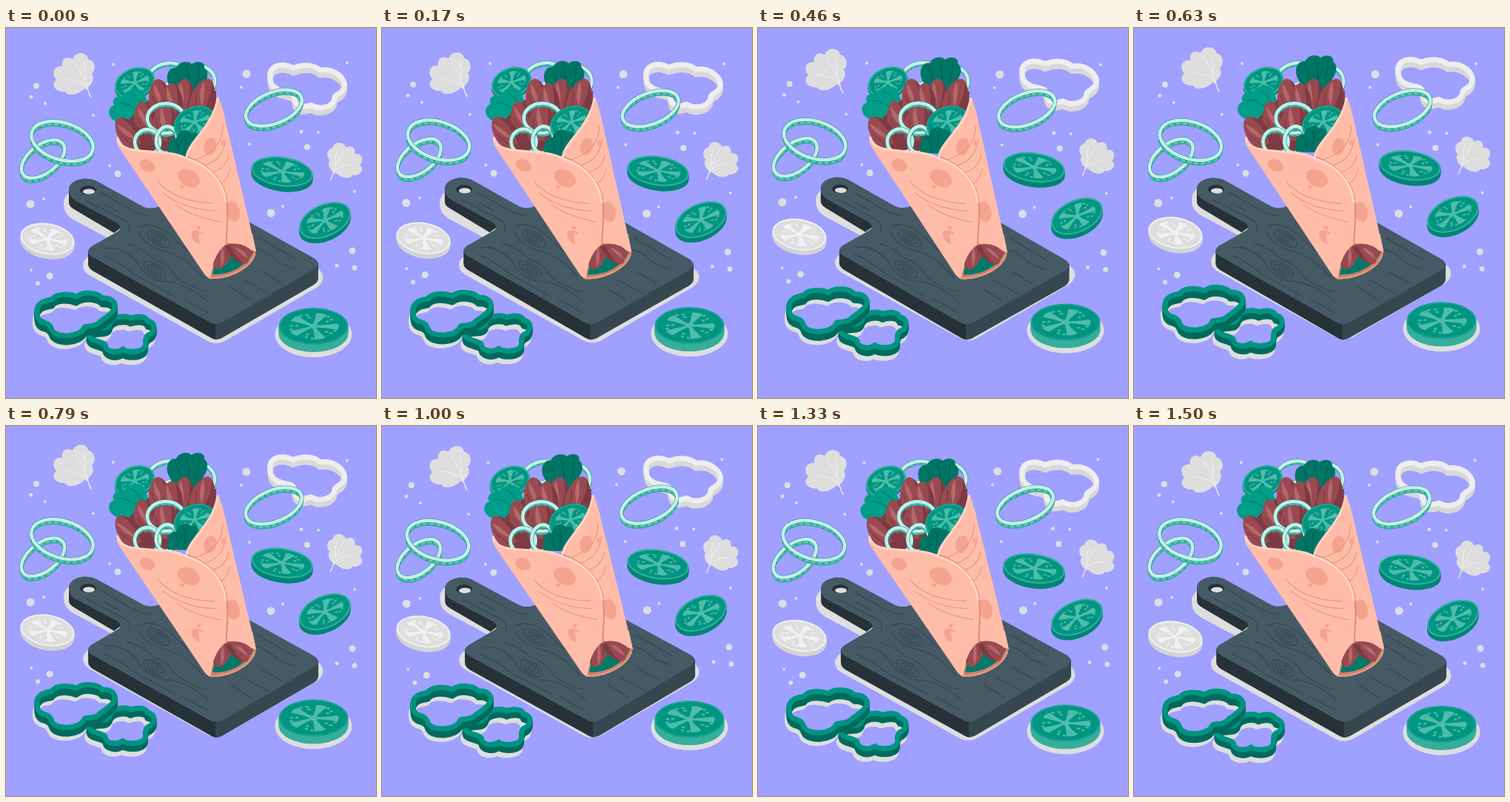
These frames come from a looping animation (500 by 500 pixels, 1540 ms). An HTML page:

```html
<!DOCTYPE html>
<html lang="en">
<head>
<meta charset="utf-8">
<title>Wrap on a board</title>
<style>
html, body { margin: 0; width: 100%; height: 100%; overflow: hidden; background: #9fa0ff; }
svg { display: block; width: 100%; height: 100%; }
</style>
</head>
<body>
<svg id="stage" viewBox="0 0 500 500"></svg>
<script>
const GREY = '#dedede';
const teal = { face: '#009582', flesh: '#4dbdab', side: '#36ae9b', rim: '#17a390' };
const tealDark = { ...teal, side: '#008474', rim: '#33b19e' };
const pale = { face: '#dedede', flesh: '#f1f1f1', side: '#d3d3d3', rim: '#f1f1f1' };

const path = (d, fill, more = '') => `<path d="${d}" fill="${fill}" ${more}/>`;
const line = (d, color, width = 1.2) =>
  path(d, 'none', `stroke="${color}" stroke-width="${width}" stroke-linecap="round" stroke-linejoin="round"`);
const oval = (x, y, rx, ry, fill, turn = 0, more = '') =>
  `<ellipse cx="${x}" cy="${y}" rx="${rx}" ry="${ry}" fill="${fill}" transform="rotate(${turn} ${x} ${y})" ${more}/>`;
const at = (x, y, art, more = '') => `<g transform="translate(${x} ${y}) ${more}">${art}</g>`;
const sway = art => `<g class="sway">${art}</g>`;
const float = (lift, art) => `<g data-lift="${lift}">${art}</g>`;

// Tomato slice: extruded disc with flared spokes and seeds between them
function tomato(x, y, rx, ry, turn, depth, c) {
  let inside = '';
  for (let i = 0; i < 5; i++) {
    inside += `<g transform="rotate(${i * 72 + 20})">` +
      path('M-4 0C-6 -26 -10 -48 -17 -68Q0 -78 17 -68C10 -48 6 -26 4 0Z', c.flesh) +
      [[22, -63], [36, -51], [29, -38]].map(([sx, sy]) => oval(sx, sy, 4.5, 5.5, c.flesh)).join('') + '</g>';
  }
  inside += `<circle r="13" fill="${c.flesh}"/>`;
  const more = `rotate(${turn}) scale(${rx / 100} ${ry / 100})`;
  let body = '';
  for (let d = depth; d > 0; d -= 2) body += oval(x, y + d, rx, ry, c.side, turn);
  return body + oval(x, y, rx, ry, c.rim, turn) + oval(x, y, rx - 2, ry - 2, c.face, turn) + at(x, y, inside, more);
}

function onion(x, y, rx, ry, turn, depth = 5) {
  const ring = (dy, color, width, extra = '') =>
    oval(x, y + dy, rx, ry, 'none', turn, `stroke="${color}" stroke-width="${width}" ${extra}`);
  return ring(depth, '#2bab98', 4) + ring(depth / 2, '#2bab98', 4) +
    ring(depth * .8, '#63c6b7', 3, 'stroke-dasharray="6 3"') +
    ring(0, '#2bab98', 5.5) + ring(0, '#dcf5f1', 4) + ring(0, '#a9ded6', .8);
}

function pepper(d, top, side, width, depth) {
  let art = '';
  for (let y = depth; y > 0; y -= 2) art += at(0, y, line(d, side, width));
  return art + line(d, top, width);
}

const meat = (x, y, turn, size = 1) => at(x, y,
  path('M-14 24C-19 4 -13 -14 -4 -20Q0 -23 5 -19C14 -10 18 6 14 25Z', '#984a50') +
  path('M5 -19C14 -10 18 6 14 25L5 24C9 8 9 -6 5 -19Z', '#7e3a42') +
  path('M-6 -16C-1 -6 2 4 2 18C-5 6 -9 -4 -6 -16Z', '#b4686d') +
  line('M-11 0Q-8 10 -6 20', '#7e3a42'), `rotate(${turn}) scale(${size})`);

const leaf = path('M114 95C112 86 110 82 106 82C96 92 82 92 80 86C66 87 60 76 68 70C60 60 66 50 76 52C74 40 84 38 90 42C94 31 110 32 111 42C121 44 122 56 116 62C121 70 114 78 110 81C111 86 114 90 116 93Z', GREY) +
  line('M113 91Q108 68 94 48M109 78Q96 70 78 68M107 70Q108 58 105 46', '#eeeeee');

const dots = [[41, 78, 4], [34, 93, 2.5], [53, 102, 2], [145, 49, 2], [118, 118, 2], [325, 62, 5.5], [318, 80, 2],
  [461, 47, 2], [399, 140, 2.5], [422, 141, 2], [407, 161, 4], [329, 157, 2], [140, 186, 2], [151, 197, 4.5],
  [33, 238, 5.5], [51, 231, 2], [34, 327, 2], [59, 335, 4.5], [43, 345, 3], [358, 250, 5.5], [374, 241, 2],
  [471, 221, 2], [468, 301, 4.5], [447, 321, 2.5], [471, 324, 3.5]]
  .map(([x, y, r]) => `<circle cx="${x}" cy="${y}" r="${r}" fill="${GREY}"/>`).join('');

const boardTop = 'M85 219C84 207 104 199 121 206L181 239Q193 247 208 241L240 223Q250 219 260 224L416 311Q427 318 416 326L294 397Q284 403 274 397L116 309Q106 302 116 295L149 276Q160 270 149 263L93 233Q85 228 85 219Z';
function board() {
  const knot = (x, y) => [17, 11, 5].map((r, i) =>
    oval(x, y, r, r * .48, 'none', 33, 'stroke="#37474f" stroke-width="1.2"')).join('');
  return path('M85 216V236Q85 241 92 245L146 277L158 268Z', '#263238') +
    path('M111 301V319Q111 324 117 328L274 417Q280 421 285 421V396Z', '#263238') +
    path('M283 398V421Q289 421 295 417L416 347Q422 343 422 338V317Z', '#37474f') +
    path(boardTop, '#455a64') +
    oval(111, 219, 11, 6, '#263238') + oval(112, 221, 8, 3.6, GREY) +
    knot(206, 285) + knot(201, 327) +
    line('M128 222L164 243Q178 252 194 254M108 233L158 259Q170 265 166 277M133 238L152 248M181 269Q202 258 232 289Q244 302 268 316M180 278Q190 296 216 302Q242 308 266 337M134 298Q156 293 177 316Q190 343 220 343Q246 346 274 371M131 307Q153 316 169 330L228 363M163 291Q186 298 199 312Q216 316 226 331T270 356M239 366L273 385M341 283L391 312M337 298Q355 302 367 316L389 325M320 340L355 359M302 349L332 368M344 328L372 344', '#37474f');
}

function filling() {
  const top = path('M222 80C213 66 220 52 230 54C234 44 248 44 251 49C258 43 270 46 268 54C276 60 271 72 268 76L258 96H228Z', '#007565') +
    line('M247 82Q249 64 243 52M256 80Q262 66 261 52M235 76Q234 66 229 60', '#005e52');
  const left = path('M150 127C137 122 136 108 146 104C141 95 152 90 158 94C161 82 181 77 187 88L196 112L170 130Z', '#009d88') +
    line('M178 112Q164 100 152 102M184 104Q178 92 169 89', '#007d6e');
  const front = path('M219 173C216 160 221 147 230 149C232 137 246 135 250 142C257 138 262 146 258 152L252 174Z', '#007565') +
    line('M240 168Q245 154 241 144M233 168Q234 158 228 153', '#005e52');
  return onion(216, 62, 23, 14, -15, 3) + tomato(174, 74, 28, 20, -22, 3, tealDark) +
    onion(263, 70, 20, 18, 35, 3) + float(4.8, top) + float(2, left) +
    path('M150 140L200 90L284 85L284 115L245 165L180 170Z', '#7e3a42') +
    meat(208, 90, -8) + meat(240, 90, 8) + meat(268, 89, 18) + meat(224, 96, 0) +
    meat(188, 120, -16) + meat(164, 139, -38) + meat(215, 125, 6, 1.1) +
    onion(216, 122, 25, 20, 0, 3) + onion(191, 154, 17, 17, -20, 3) + onion(217, 151, 14, 18, 10, 3) +
    tomato(255, 127, 29, 21, -20, 4, teal) + float(3, front);
}

function wrap() {
  const spot = '#f4a48e', crease = '#ea9780', light = '#ffd4c6';
  return filling() +
    path('M150 147C153 168 181 164 206 167Q231 168 243 176C242 154 281 133 287 92L293 110L338 302C331 325 304 340 276 339Q271 337 267 331L153 162Q148 155 150 147Z', '#ffbda9') +
    oval(191, 186, 11, 8, spot, 25) + oval(247, 203, 16, 11, spot, 28) + oval(238, 215, 3, 2.4, spot) +
    oval(276, 160, 8.5, 12, spot, 12) + oval(293, 155, 2, 4, spot) + oval(307, 248, 9, 14, spot, -12) +
    oval(261, 283, 12, 8, spot, 40) + oval(260, 270, 3, 2, spot, 20) +
    line('M205 207Q228 235 281 237M212 223Q239 245 283 247M230 239Q252 255 290 262M293 132Q293 166 255 178M297 150Q293 181 265 186M301 171Q297 191 277 195M303 190Q300 205 290 210', crease) +
    path('M299 291C288 297 280 312 276 339C304 340 331 325 338 302Q318 289 299 291Z', '#cb8069') +
    path('M299 292C289 299 282 313 279 333C302 334 326 322 334 302Q318 290 299 292Z', '#00796a') +
    meat(290, 309, 195, .82) + meat(316, 304, 145, .8) +
    path('M276 339C279 315 286 299 299 291L338 302L333 278H260L267 331Z', '#ffbda9') +
    path('M299 291C294 296 289 299 286 306Q290 294 299 291Z', '#eaa18c') +
    path('M299 292Q321 288 334 303L331 309Q318 296 299 294Z', '#984a50') +
    line('M276 338C299 338 329 327 336 306', '#e19880', 2.5) +
    line('M245 174C277 186 297 209 299 238C301 262 297 279 298 293', '#df8c76', 2) +
    line('M151 149C155 168 181 165 206 168Q231 169 243 176C273 185 294 206 297 235M286 95C280 133 247 153 244 174', light, 3);
}

const bigRing = 'M42 385C40 370 55 368 62 367C68 357 88 360 95 363C105 355 125 358 130 365C148 364 152 378 142 385C136 392 130 394 127 397C122 404 112 402 106 404C102 418 68 420 62 408C60 402 58 400 52 398C44 396 42 392 42 385Z';
const smallRing = 'M140 401C142 388 164 388 168 392C180 388 190 390 191 396C204 398 202 412 192 415C186 420 190 424 188 430C184 440 160 438 158 434C150 440 134 438 134 428C128 422 112 424 112 414C114 408 122 406 128 406C136 406 138 404 140 401Z';
const paleRing = 'M357 66C355 51 372 46 388 54C402 48 418 50 424 57C444 54 460 68 457 80C454 90 446 88 444 94C444 106 424 112 412 104C400 109 390 106 390 94C388 84 374 88 366 82C358 78 357 72 357 66Z';

stage.innerHTML =
  sway(dots) +
  float(4.5, leaf + at(536, 126, leaf, 'scale(-.85 .85)')) +
  float(4.2, pepper(paleRing, '#eeeeee', '#d8d8d8', 7, 7)) +
  float(4.5, tomato(373, 194, 42, 20, 8, 7, tealDark) + tomato(431, 260, 37, 22, -24, 6, tealDark) +
    tomato(56, 285, 37, 21, 10, 6, pale)) +
  sway(onion(50, 177, 34, 19, -38) + onion(76, 153, 43, 25, 17) + onion(362, 108, 40, 21, -22)) +
  float(3, at(0, 19, path(boardTop, GREY, `stroke="${GREY}" stroke-width="14" stroke-linejoin="round"`))) +
  sway(board() + wrap()) +
  float(4.3, at(-2, 14, line(bigRing + smallRing, GREY, 8)) +
    pepper(smallRing, '#009481', '#006a5d', 7, 8) + pepper(bigRing, '#009481', '#006a5d', 7, 9)) +
  float(4.2, oval(415.5, 414, 52, 31, GREY) + tomato(415.5, 403, 47, 25, 0, 10, teal));

const swaying = stage.querySelectorAll('.sway');
const floating = stage.querySelectorAll('[data-lift]');
const LOOP = 1540, STEPS = 37;

function draw() {
  // 24 drawings per second
  const step = Math.floor(performance.now() % LOOP * .024 + .1);
  const angle = step / STEPS * 2 * Math.PI;
  const turn = .7 * Math.sin(angle);
  swaying.forEach(g => g.setAttribute('transform', `rotate(${turn} 250 212)`));
  floating.forEach(g => g.setAttribute('transform', `translate(0 ${g.dataset.lift * (Math.cos(angle) - 1)})`));
  requestAnimationFrame(draw);
}
draw();
</script>
</body>
</html>
```
